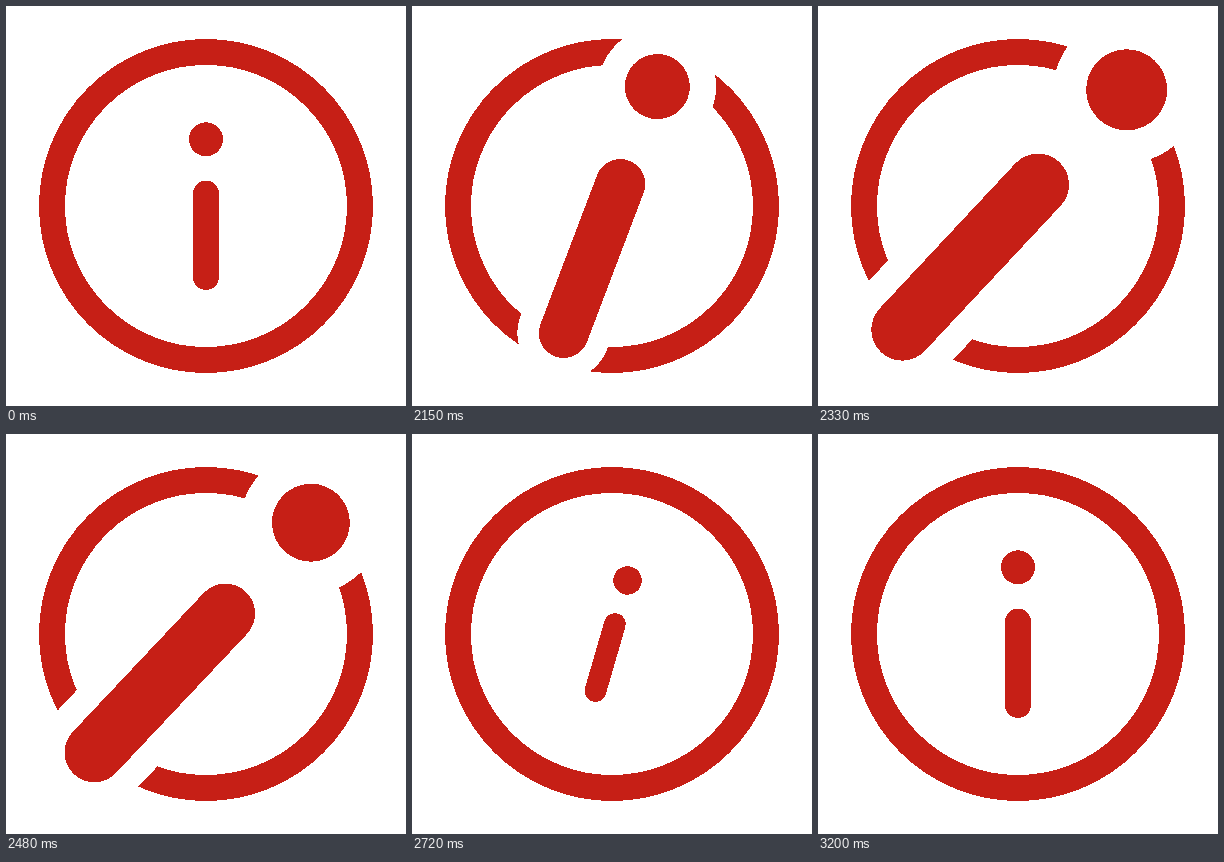
Write an HTML page that moves like this. It is 400 px wide and 400 px high and loops after 3.23 s.

```html
<!DOCTYPE html>
<html lang="en">
<head>
<meta charset="utf-8">
<title>Info icon</title>
<style>
  html, body { margin: 0; width: 100%; height: 100%; overflow: hidden; background: #fff; }
  svg { display: block; width: 100%; height: 100%; shape-rendering: crispEdges; }
  .ink { stroke: #c61f16; }
  .halo { stroke: #fff; }
  path, circle { fill: none; stroke-linecap: round; }
</style>
</head>
<body>
<svg viewBox="0 0 400 400">
  <circle class="ink" cx="200" cy="200" r="154" stroke-width="26"/>
  <g id="letter">
    <g class="halo">
      <path d="M0 -66.7h0" stroke-width="61.4"/>
      <path d="M0 -12.3V71" stroke-width="48.4"/>
    </g>
    <g class="ink">
      <path d="M0 -66.7h0" stroke-width="34"/>
      <path d="M0 -12.3V71" stroke-width="26"/>
    </g>
  </g>
</svg>
<script>
const LOOP = 3230, START = 2000, STEP = 30;

// [step, value]
const SCALE = [[0.7, 1], [5, 1.915], [8, 2.35], [11, 2.385], [15, 2.34], [18, 2.1],
  [20, 1.76], [24, 0.836], [25.8, 0.76], [33, 1]];
const ANGLE = [[0.7, 0], [5, 20.8], [9, 41.2], [11, 43.1], [14, 43.5], [18, 42.8],
  [20, 38.8], [24, 16.2], [29, 0]];

const letter = document.getElementById('letter');
const slope = (a, b) => (b[1] - a[1]) / (b[0] - a[0]);

// Tangent that never overshoots: flat at ends and turning points.
function tangent(keys, i) {
  if (i === 0 || i === keys.length - 1) return 0;
  const a = slope(keys[i - 1], keys[i]);
  const b = slope(keys[i], keys[i + 1]);
  return a * b > 0 ? 2 * a * b / (a + b) : 0;
}

function valueAt(keys, x) {
  const last = keys.length - 1;
  if (x <= keys[0][0]) return keys[0][1];
  if (x >= keys[last][0]) return keys[last][1];
  const i = keys.findIndex(k => k[0] > x) - 1;
  const [x0, y0] = keys[i], [x1, y1] = keys[i + 1];
  const h = x1 - x0, u = (x - x0) / h, v = 1 - u;
  return y0 * v * v * (1 + 2 * u) + y1 * u * u * (1 + 2 * v)
    + h * u * v * (tangent(keys, i) * v - tangent(keys, i + 1) * u);
}

function draw(time) {
  const step = Math.max(0, Math.floor((time % LOOP - START) / STEP));
  const angle = valueAt(ANGLE, step), scale = valueAt(SCALE, step);
  letter.setAttribute('transform', `translate(200 200) rotate(${angle}) scale(${scale})`);
}

const origin = performance.now();
function tick() {
  draw(performance.now() - origin);
  requestAnimationFrame(tick);
}
tick();
</script>
</body>
</html>
```
